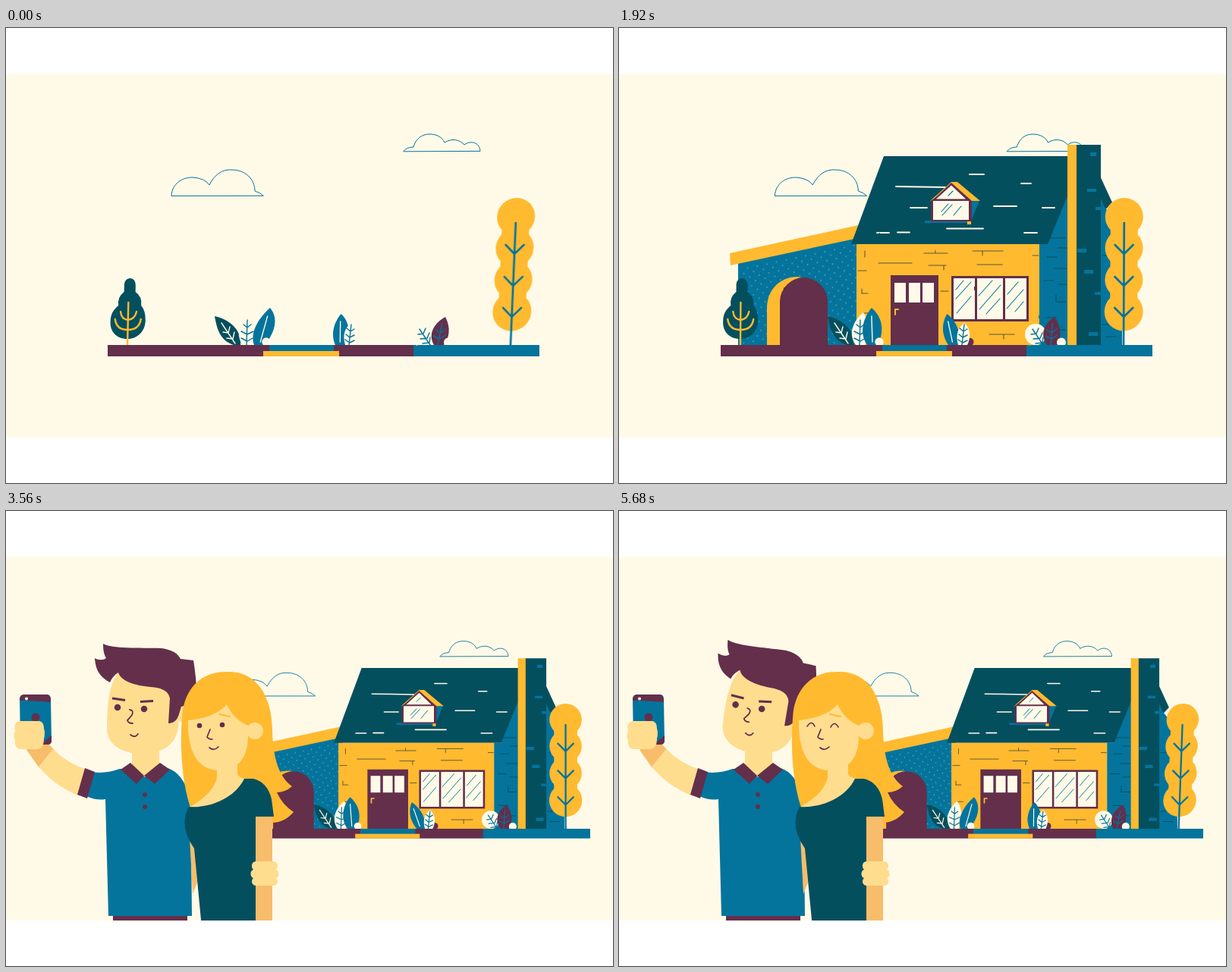
These frames come from a looping animation (800x600 px, 5720 ms). An HTML page:

```html
<!DOCTYPE html>
<html lang="en">
<head>
<meta charset="utf-8">
<title>Couple and house</title>
<style>
html, body { margin: 0; width: 100%; height: 100%; overflow: hidden; background: #fff; }
svg { display: block; width: 800px; height: 600px; }
.c { fill: #fffae8 } .y { fill: #ffba30 } .b { fill: #04749c } .d { fill: #044f5e }
.p { fill: #632f4b } .s { fill: #ffdd8f } .t { fill: #f7bd6a }
.l { fill: none; stroke-linecap: round; stroke-linejoin: round; stroke-width: 1.4 }
.lb { stroke: #04749c } .lc { stroke: #fffae8 } .ly { stroke: #ffba30 } .lp { stroke: #632f4b } .ld { stroke: #5d5a35 }
</style>
</head>
<body>
<svg viewBox="0 0 800 600">
<defs>
  <clipPath id="stage"><rect y="60" width="800" height="480"/></clipPath>
  <clipPath id="above"><rect y="60" width="800" height="360"/></clipPath>
  <pattern id="dots" width="13" height="12" patternUnits="userSpaceOnUse" patternTransform="rotate(-12)">
    <path d="M2 3h1.4M8.5 9h1.4" stroke="#9ccbd6" stroke-width="1.1"/>
  </pattern>
  <filter id="rough" filterUnits="userSpaceOnUse" x="110" y="140" width="620" height="310" color-interpolation-filters="sRGB">
    <feTurbulence type="fractalNoise" baseFrequency=".08" numOctaves="1" seed="4"/>
    <feDisplacementMap in="SourceGraphic" scale="1.7" xChannelSelector="R" yChannelSelector="G"/>
  </filter>
</defs>
<g clip-path="url(#stage)">
  <rect class="c" y="60" width="800" height="480"/>

  <g id="clouds" class="l lb" style="stroke-width:1">
    <path d="M218 221C219 205 232 197 246 197Q262 198 268 207C275 193 285 186 298 187C315 187 328 199 328 215Q335 217 339 221Z"/>
    <path d="M524 162.5Q528 157 537 157C540 146 548 140 558 140C568 140 575 144 578 151C588 145 598 147 604 154C612 148 624 150 625 162Z"/>
  </g>

  <g id="world"><g filter="url(#rough)">
    <g clip-path="url(#above)">
      <g id="wing">
        <path class="b" d="M157 305L320 270V420H157Z"/>
        <path fill="url(#dots)" d="M160 314L320 279V416H160Z"/>
        <path class="y" d="M146 297L320 259V276L147 313ZM195 420V370C195 345 212 328 236 328L250 332V420Z"/>
        <path class="p" d="M212 420V361A31.5 32 0 0 1 275 361V420Z"/>
      </g>
      <g id="house">
        <path class="d" d="M349 169H622L650 230L636 245L600 285H306Z"/>
        <path class="b" d="M554 285H565L604 190L616 182L640 236L655 255L663 290V420H554Z"/>
        <path class="y" d="M313 285H554V420H313Z"/>
        <path class="l ld" style="stroke-width:1.1" d="M324 294v8M402 297h31M417 293v4M466 294h40M479 294v6M342 310h44M408 313h23M428 313v6M472 312h33M315 320h11M320 350h8M320 344v6M424 347h10M488 404h33M507 404v6M545 300h8M322 376h9"/>
        <path class="l" stroke="#044f5e" style="stroke-width:1.1" d="M568 277h20M564 302h13M578 290h12M574 317h16M560 333h13M579 338h11M576 352v9M576 361h13M562 382h14M578 398h10M641 407h14M637 391h8M638 300h8"/>
        <path class="l lc" style="stroke-width:1.8" d="M462 193h19M365 209l65 1M530 205h13M384 237h22M494 235h30M558 237h16M340 270h16M367 269.500h16M432 264.500h48M534 270h17"/>
        <circle class="p" cx="462" cy="414" r="5.500"/>
        <g id="dormer">
          <path class="b" d="M462 228H475L463 257H403V254H462Z"/>
          <path class="y" d="M409 229L438 203H446L476 228H464L440 209ZM459 254h5v5h-5Z"/>
          <path class="p" d="M411 229L438 204L465 228V255H411Z"/>
          <path class="c" d="M418 225.500L438 207.500L457 225.500ZM414 228H461V253H414Z"/>
          <path class="l lb" style="stroke-width:1.1" d="M434 221l6-6M425 242l9-10M426 247l13-14M441 247l10-12"/>
        </g>
        <g id="door">
          <path class="p" d="M358 326H421V420H358Z"/>
          <path class="c" d="M363 336h15v26h-15ZM382 336h15v26h-15ZM400 336h15v26h-15Z"/>
          <path class="l ly" style="stroke-width:2" d="M364 378V371H368"/>
        </g>
        <g id="window">
          <path class="p" d="M438 327H540V387H438Z"/>
          <path class="c" d="M441 330h28v54h-28ZM472 330h34v54h-34ZM509 330h28v54h-28Z"/>
          <path class="l lb" style="stroke-width:1.1" d="M444 345l10-12M444 357l20-22M445 376l19-22M474 353l18-20M475 371l28-32M484 377l18-20M512 351l14-16M511 370l22-25M522 374l11-13"/>
        </g>
      </g>
      <g id="chimney">
        <path class="y" d="M591 154H605V420H591Z"/>
        <path class="d" d="M603 154H635V420H603Z"/>
        <path class="b" d="M621 164h8v5h-8ZM617 212h12v4h-12ZM628 236h7v4h-7ZM604 291h12v5h-12ZM613 319h12v5h-12ZM627 348h8v4h-8ZM619 401h12v5h-12Z"/>
      </g>
    </g>

    <g id="bush">
      <path class="d" d="M162 330Q169 331 169 340V348Q178 354 177 366Q183 373 183 386C183 400 173 410 160 410C145 410 136 400 137 386C137 376 142 370 147 366Q145 355 154 348V338Q155 330 162 330Z"/>
      <path class="l ly" style="stroke-width:2.400" d="M160 362V418M150 374Q151 384 160 385Q169 384 171 374M143 384Q145 398 160 398Q175 398 177 384"/>
    </g>
    <g id="tree">
      <g class="y"><circle cx="665" cy="249" r="25"/><circle cx="665" cy="290" r="25"/><circle cx="665" cy="332" r="25"/><circle cx="665" cy="374" r="25.500"/><path d="M647 255h36v110h-36Z"/></g>
      <path class="l lb" style="stroke-width:2.700" d="M665 257V418M653 286L665 298L677 286M653 328L665 340L677 328M653 369L665 381L677 369"/>
    </g>

    <path class="d" d="M300 418C282 412 278 397 275 380C297 385 311 400 309 418Z"/>
    <path class="l lc" d="M284 389L302 416M286 401l7 1l2-8M291 409l8 1l2-9"/>
    <path class="c" d="M312 418C300 402 311 384 322 375C331 389 331 404 324 418Z"/>
    <path class="l lb" d="M318 385L317 418M313 391l5 4l5-4M310 400l8 4l8-4M310 409l8 4l7-4"/>
    <g id="leaf1">
      <path class="b" d="M327 418C316 402 322 382 333 369C348 382 350 400 341 418Z"/>
      <path class="l lc" d="M333 380L334 414"/>
    </g>
    <circle class="c" cx="343" cy="414" r="5.700"/>
    <g id="leaf2">
      <path class="b" d="M434 418C426 403 430 388 438 377C449 386 454 403 447 418Z"/>
      <path class="l lc" d="M438 387L440 414"/>
    </g>
    <path class="c" d="M447 418C443 404 447 395 455 389C465 398 463 410 459 418Z"/>
    <path class="l lb" d="M455 391L452 418M449 396l5 4l5-3M448 404l5 4l6-3M447 411l6 4l6-3"/>
    <circle class="c" cx="549" cy="404" r="14"/>
    <path class="l lb" d="M545 397L559 418M553 396l-3 7l-7 1M558 402l-3 7l-9 1M559 408l-1 7l-9 1"/>
    <g id="leaf3">
      <path class="p" d="M564 418C555 403 564 389 578 381C586 395 584 409 577 418Z"/>
      <path class="l lb" d="M574 390L569 418M566 398l6 4l7-5M563 406l8 4l8-5"/>
    </g>
    <circle class="c" cx="583" cy="414.500" r="6"/>

    <path class="p" d="M134 418H538V433H134Z"/>
    <path class="b" d="M537 418H703V433H537ZM347 418H432V427H347Z"/>
    <path class="y" d="M339 426H439V433H339Z"/>
  </g></g>

  <g id="people">
    <path class="t" d="M27 315L50 300L66 318L44 339Z"/>
    <path class="s" d="M62 314Q80 332 106 341L97 376Q63 362 43 337Z"/>
    <path class="p" d="M141 530H239V560H141Z"/>
    <path class="b" d="M150 340Q130 347 114 344L106 376Q119 382 131 380L135 534H245L244 440L242 375Q232 345 213 339Z"/>
    <path class="p" d="M104 339L117 344L107 379L94 374Z"/>
    <path class="s" d="M166 305H202V337L183 351L166 337Z"/>
    <path class="p" d="M151 341L164 332L182 349L172 360ZM182 349L203 332L216 341L196 360Z"/>
    <g class="p"><circle cx="183" cy="374" r="3"/><circle cx="183" cy="390" r="3"/></g>
    <path class="b" d="M18 248Q18 242 24 242H54Q59 242 59 248L60 303Q60 308 54 308H24Q20 308 19 303Z"/>
    <path class="p" d="M18 250Q18 242 24 242H54Q59 242 59 252L28 250ZM45 308L60 296V303Q60 308 54 308Z"/>
    <circle class="p" cx="39" cy="272" r="5.500"/><circle class="c" cx="27" cy="247.500" r="2"/>
    <path class="s" d="M17 277H44Q50 278 50 287Q52 293 50 300Q50 313 42 314H18Q11 312 12 303Q9 297 12 290Q9 280 17 277Z"/>

    <g id="manHead">
      <circle class="s" cx="235" cy="268" r="11"/>
      <path class="s" d="M148 213C134 230 133 265 133 288C134 308 152 320 178 320C207 320 224 308 227 285L230 230L190 205Z"/>
      <path class="p" d="M128 175C140 182 175 180 205 181C218 183 226 187 230 195L247 197C250 215 252 235 251 252L231 258C227 270 227 279 214 280L216 247C214 237 205 233 190 232C170 230 152 225 148 213C143 216 139 221 137 226C126 220 118 212 117 194C122 197 128 197 132 194C129 189 128 183 128 175Z"/>
      <path class="l lp" style="stroke-width:3;stroke-linecap:butt" d="M140 247L157 249.500M177 251.500L194 250.500"/>
      <g class="p"><circle cx="147" cy="259" r="4.300"/><circle cx="182" cy="261" r="4.300"/></g>
      <path class="l lp" style="stroke-width:1.800" d="M163 262Q169 263 166 269Q163 273 160 276Q161 280 167 280M164 295Q170 300 174 294"/>
    </g>

    <g id="woman">
      <path class="t" d="M242 430L249 448L252 490L246 505Z"/>
      <path id="hair" class="y" d="M290 212C325 210 350 236 351 290C352 328 361 352 377 363Q368 371 357 371Q364 387 379 397Q366 412 348 411L243 391C228 345 230 290 233 262C239 230 260 212 290 212Z"/>
      <path class="s" d="M278 330H305V348Q310 353 318 353L300 398L241 391Q273 373 278 352Z"/>
      <g id="womanHead">
        <circle class="s" cx="328" cy="290" r="11"/>
        <path class="s" d="M240 276C239 325 258 343 283 342C306 341 319 325 319 297V283Q300 275 291 255Q277 272 240 276Z"/>
        <path class="l ly" style="stroke-width:2" d="M247 269L262 268M281 268L295 271"/>
        <g id="open" class="p"><circle cx="255" cy="283" r="3.300"/><circle cx="285" cy="282" r="3.300"/></g>
        <path id="shut" class="l lp" style="stroke-width:1.600" d="M251 284Q257 275 261 284M282 285Q287 276 292 285"/>
        <path class="l lp" style="stroke-width:1.700" d="M269 288L265 298Q267 301 272 301M268 312Q274 317 280 311"/>
      </g>
      <path class="t" d="M329 395H351V560H329Z"/>
      <path class="d" d="M241 390C270 392 302 378 314 353H326Q345 358 350 380L353 403H329V560H259L248 445Q227 415 241 390Z"/>
      <g class="s"><rect x="324" y="462" width="34" height="12" rx="5.500"/><rect x="322.500" y="472.500" width="37" height="12" rx="5.500"/><rect x="324" y="483" width="34" height="11" rx="5.500"/><path d="M328 465h26v26h-26Z"/></g>
    </g>
  </g>
</g>
</svg>
<script>
const LOOP = 5720;
const el = id => document.getElementById(id);
const move = (id, value) => el(id).setAttribute('transform', value);
const show = (id, on) => { el(id).style.display = on ? '' : 'none'; };
const unit = (t, start, length) => Math.min(1, Math.max(0, (t - start) / length));
const smooth = u => u * u * (3 - 2 * u);
// distance left to travel, easing out
const left = (t, start, length) => (1 - unit(t, start, length)) ** 3;
const wave = (t, period, peak = 0) => Math.cos(2 * Math.PI * (t - peak) / period);
const lean = (id, y, slope) => move(id, `matrix(1 0 ${-slope} 1 ${slope * y} 0)`);
const grow = (id, x, y, sx, sy) => move(id, `translate(${x} ${y}) scale(${sx} ${sy}) translate(${-x} ${-y})`);
// zoom that keeps the ground line at height y
const zoom = (id, x, s, y) => move(id, `translate(${x} ${y - 418 * s}) scale(${s})`);

function draw(t) {
  move('house', `translate(0 ${270 * left(t, 80, 985)})`);
  move('chimney', `translate(0 ${280 * left(t, 200, 1045)})`);
  move('wing', `translate(${200 * left(t, 420, 837)} 0)`);
  show('wing', t > 420);
  const pop = 1 - left(t, 300, 800);
  grow('dormer', 438, 258, 1, pop);
  grow('door', 389.5, 418, pop, pop);
  grow('window', 489, 357, pop, pop);

  lean('tree', 418, (2 + 5 * wave(t, 2700)) / 165);
  lean('bush', 418, 2 * wave(t, 1600) / 85);
  lean('leaf1', 418, (5 + 10 * wave(t, LOOP)) / 49);
  lean('leaf2', 418, (-4 + 8 * wave(t, LOOP, 300)) / 41);
  lean('leaf3', 418, (-2 + 3 * wave(t, LOOP)) / 37);

  const pan = 1 - (1 - unit(t, 2340, 1100) ** 1.2) ** 4.15;
  const away = 1 - pan;
  const far = 1 - .11 * pan;
  zoom('world', 171.7 * pan, 1 - .149 * pan, 418 + pan);
  zoom('clouds', 126.6 * pan - .0066 * t * far, far, 418 + pan);
  zoom('people', -993 * away, 1 + .927 * away, 418 + 2 * away);

  // heads and hair trail behind while the couple slides in, then they pose
  const lag = 1 - smooth(unit(t, 2680, 760));
  const pose = smooth(unit(t, 3640, 400));
  move('manHead', `rotate(${6 * pose - 5 * lag} 185 320)`);
  move('womanHead', `rotate(${-4 * lag} 290 340)`);
  move('woman', `translate(${2 * lag - 3 * pose} 0)`);
  lean('hair', 213, -.05 * lag);
  show('open', pose < .5);
  show('shut', pose >= .5);
}

const begin = performance.now();
function tick() {
  draw((performance.now() - begin) % LOOP);
  requestAnimationFrame(tick);
}
tick();
</script>
</body>
</html>
```
